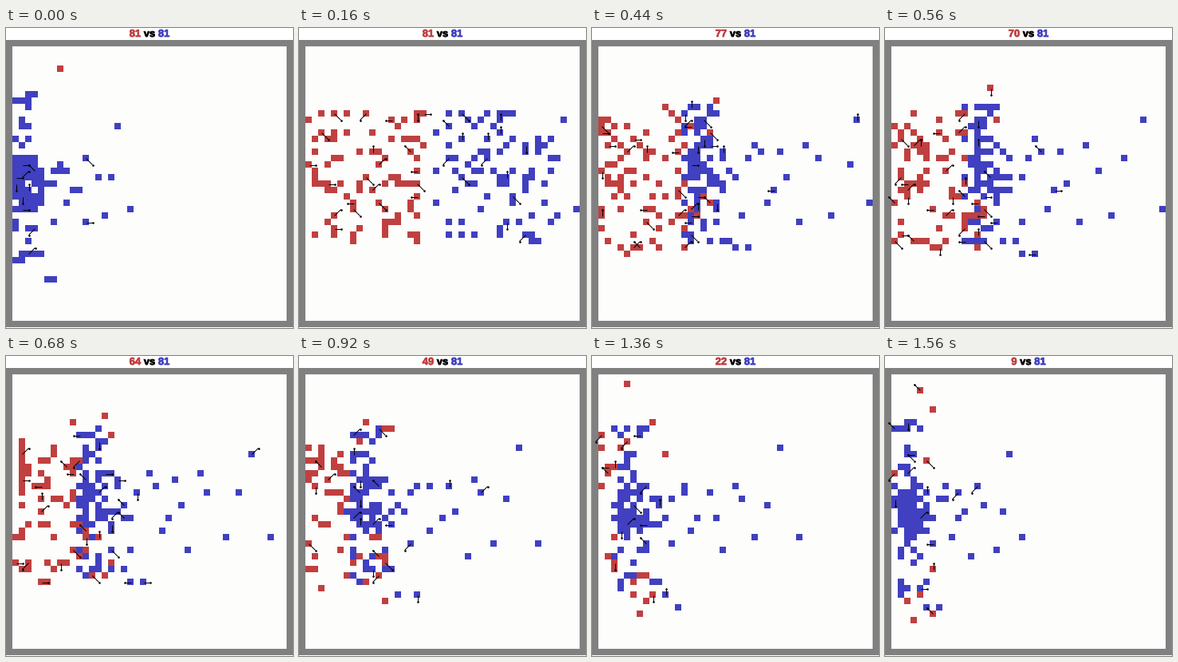
Write a matplotlib script that moves like this. It is 360 by 376 pixels and loops after 1.6 s.

```python
import numpy as np
import matplotlib.pyplot as plt
import matplotlib.patheffects as pe
from matplotlib.animation import FuncAnimation
from matplotlib.collections import LineCollection
from itertools import product

W, H, DPI = 360, 376, 100
N, CELL, TOP = 45, 8, 15
FRAMES, STEP_MS = 40, 40
START = 4  # frame at which the opening formation stands
ARMY = 81
MID_ROW = 21
LAST_RED = (8, 4)
RED, BLUE = "#c04040", "#4040c0"
PALETTE = np.array([[253, 253, 252], [128, 128, 128],
                    [192, 64, 64], [64, 64, 192]], np.uint8)
FIELD, WALL, RED_ID, BLUE_ID = range(4)
PX = 72 / DPI
COMPASS = [d for d in product((-1, 0, 1), repeat=2) if d != (0, 0)]

rng = np.random.default_rng(12)


def scatter(left, right, weight):
    """Pick distinct cells in the band of rows around the middle."""
    spots = list(product(range(left, right + 1),
                         range(MID_ROW - 10, MID_ROW + 11)))
    p = np.array([weight(c) for c, _ in spots])
    picks = rng.choice(len(spots), ARMY, replace=False, p=p / p.sum())
    return [spots[i] for i in picks]


def ranks_of(units):
    """Place of each unit from left (0) to right (1)."""
    order = np.argsort([c for c, _ in units], kind="stable")
    ranks = np.empty(len(units))
    ranks[order] = np.linspace(0, 1, len(units))
    return ranks


def blue_goal(rank, row, frame):
    """A dense front marching left, with a thin trailing tail."""
    front = np.interp(frame, [START, 11, 23, FRAMES], [21, 14, 7.5, 1])
    depth = np.interp(frame, [33, FRAMES], [1, 0.6])
    col = front + depth * (6.5 * rank + 23.5 * rank ** 9)
    way = (frame - START) / (FRAMES - START)
    s = (row - MID_ROW) / 10
    return col, MID_ROW + 2 * way + s * (10 - 4 * way) + 8 * way * s ** 5


def red_goal(rank, row, frame):
    """A loose crowd pressed ever closer to the left wall."""
    reach = np.interp(frame, [START, 23, FRAMES], [18, 12, 6])
    return 1 + reach * rank ** 1.3, row + rng.normal(0, 2)


def move(units, goals, others, noise, moves=1):
    """Let every unit step to the free neighbour closest to its goal."""
    units = list(units)
    taken = set(units) | set(others)
    for _ in range(moves):
        for i in rng.permutation(len(units)):
            c, r = units[i]
            gc, gr = goals[i]
            taken.discard((c, r))
            best, spot = 1e9, (c, r)
            for dc, dr in [(0, 0)] + COMPASS:
                n = (c + dc, r + dr)
                if n in taken or not (1 <= n[0] <= 43 and 1 <= n[1] <= 43):
                    continue
                cost = np.hypot(n[0] - gc, 0.7 * (n[1] - gr))
                cost += noise * rng.random()
                if cost < best:
                    best, spot = cost, n
            units[i] = spot
            taken.add(spot)
    return units


def cull(red, blue, count):
    """Remove reds, mostly those closely surrounded by blue."""
    foes = np.array(blue)
    threat = [np.sum(np.abs(foes - u).max(axis=1) <= 2) + 5 * rng.random()
              for u in red]
    return [red[i] for i in sorted(np.argsort(threat)[:count])]


def aim(red, blue):
    """Give some units a random direction to point at."""
    chances = [0.28] * len(red) + [0.15] * len(blue)
    return [(*u, *COMPASS[rng.integers(8)])
            for u, p in zip(red + blue, chances) if rng.random() < p]


def simulate():
    red0 = scatter(1, 19, lambda c: 1)
    blue0 = scatter(21, 43, lambda c: np.exp(-((c - 32) / 9) ** 2))
    states = {START: (red0, blue0, aim(red0, blue0), ARMY)}

    red, blue = red0, blue0
    for f in range(START - 1, 0, -1):
        red = move(red, red0, blue, 2.5)
        blue = move(blue, blue0, red, 2.5)
        states[f] = (red, blue, aim(red, blue), ARMY)

    red, blue = red0, blue0
    blue_rank = ranks_of(blue0)
    for f in range(START + 1, FRAMES + 1):
        goals = [blue_goal(u, r, f) for u, (_, r) in zip(blue_rank, blue0)]
        blue = move(blue, goals, red, 1.2, 3)
        goals = [red_goal(u, r, f) for u, (_, r) in zip(ranks_of(red), red)]
        red = move(red, goals, blue, 4)
        left = round(np.interp(f, [8, 11, 17, 29, 39], [81, 77, 64, 34, 9]))
        red = cull(red, blue, left)
        states[f] = (red, blue, aim(red, blue), left)

    # The loop opens on the closing field with the score already reset
    red, blue = [LAST_RED], states.pop(FRAMES)[1]
    states[0] = (red, blue, aim(red, blue), ARMY)
    return states


states = simulate()

fig = plt.figure(figsize=(W / DPI, H / DPI), dpi=DPI, facecolor="white")
ax = fig.add_axes([0, 0, 1, 1])
board = ax.imshow(np.zeros((N, N, 3), np.uint8), interpolation="nearest",
                  extent=(0, W, TOP + N * CELL, TOP), aspect="auto")
ax.set_xlim(0, W)
ax.set_ylim(H, 0)
ax.axis("off")

lines = LineCollection([], colors="black", linewidths=PX, zorder=3)
ax.add_collection(lines)
dots, = ax.plot([], [], "o", color="black", ms=2.6 * PX, mew=0, zorder=4)

SIZE = 13
DIGIT, SPACE = 0.556 * SIZE, 0.278 * SIZE  # advance widths of the face
title = [ax.text(0, 11, "", color=c, family="Liberation Sans", weight="bold",
                 size=SIZE * PX, va="baseline",
                 path_effects=[pe.withStroke(linewidth=0.7 * PX,
                                             foreground=c)])
         for c in (RED, "black", BLUE)]


def centre(c, r):
    return CELL * c + 4.5, CELL * r + TOP + 4.5


def draw(frame):
    red, blue, aims, left = states[frame]
    grid = np.full((N, N), WALL)
    grid[1:-1, 1:-1] = FIELD
    for units, colour in ((red, RED_ID), (blue, BLUE_ID)):
        for c, r in units:
            grid[r, c] = colour
    board.set_data(PALETTE[grid])

    segments = [(centre(c, r), centre(c + dc, r + dr))
                for c, r, dc, dr in aims]
    lines.set_segments(segments)
    tips = np.array([s[1] for s in segments]).reshape(-1, 2)
    dots.set_data(tips[:, 0], tips[:, 1])

    words = [str(left), "vs", str(len(blue))]
    x = W / 2 - (sum(map(len, words)) * DIGIT + 2 * SPACE) / 2
    for label, word in zip(title, words):
        label.set_text(word)
        label.set_x(x)
        x += len(word) * DIGIT + SPACE
    return [board, lines, dots, *title]


anim = FuncAnimation(fig, draw, frames=FRAMES, interval=STEP_MS,
                     repeat=True, repeat_delay=0, blit=False)
plt.show()
```
